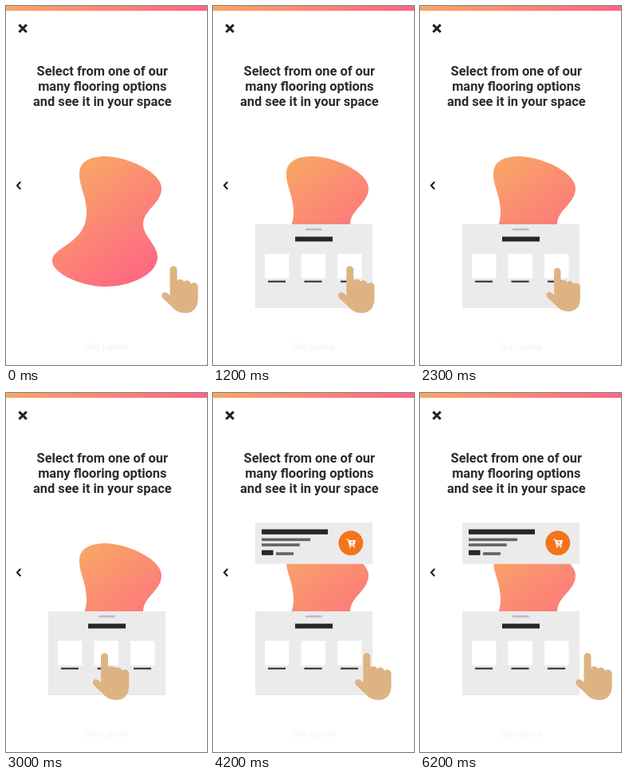
These frames come from a looping animation (252x449 px, 6.3 s). An HTML page with a canvas:

```html
<!DOCTYPE html>
<html lang="en">
<head>
<meta charset="utf-8">
<title>Flooring tutorial</title>
<style>
  html, body { margin: 0; width: 100%; height: 100%; overflow: hidden; background: #fff; }
  canvas { display: block; width: 252px; height: 449px; }
</style>
</head>
<body>
<canvas id="stage"></canvas>
<script>
const W = 252, H = 449, LOOP = 6300;
const canvas = document.getElementById('stage');
const ctx = canvas.getContext('2d');
const ratio = window.devicePixelRatio || 1;
canvas.width = Math.round(W * ratio);
canvas.height = Math.round(H * ratio);

const DARK = '#262626', GREY = '#646464', PANEL = '#ebebeb';
const PITCH = 45.5;

const blob = new Path2D('M92 208C93 192 110 188 124 188C152 188 195 208 195 228' +
  'C195 247 172 255 172 273C172 288 190 299 190 314C190 335 157 351 124 351' +
  'C94 351 58 334 58 319C58 300 101 298 101 258C101 237 91 224 92 208Z');
const HAND = { x: 218, y: 354.5 };
const hand = new Path2D('M205.5 330C205.5 323.8 214.5 323.8 214.5 330V344' +
  'C216 341 222 341 223 345C225 342 231 343 232 347.5C235 344.5 240.7 346 240.7 351' +
  'V366C240.7 378 234 384 225 384C216 384 211 380 207 375L197 366' +
  'C193 361 197 356 202 359L205.5 362Z');

const clamp = v => Math.min(1, Math.max(0, v));
const mix = (a, b, p) => a + (b - a) * p;
const outCubic = p => 1 - (1 - p) ** 3;
const inOutCubic = p => p < .5 ? 4 * p ** 3 : 1 - 4 * (1 - p) ** 3;
const inOutSine = p => (1 - Math.cos(Math.PI * p)) / 2;
const outBack = p => 1 + 2.70158 * (p - 1) ** 3 + 1.70158 * (p - 1) ** 2;
const linear = p => p;

// Each move is [start, end, value, easing]; the value holds between moves.
function track(t, value, moves) {
  for (const [start, end, to, ease] of moves) {
    if (t < start) break;
    value = mix(value, to, ease(clamp((t - start) / (end - start))));
  }
  return value;
}

const LEFT = 88.7, RIGHT = LEFT + 2 * PITCH;
const handX = t => track(t, HAND.x, [
  [700, 1200, RIGHT, outCubic],
  [1300, 1800, LEFT, inOutCubic],
  [1800, 2200, RIGHT, outCubic],
  [2300, 2800, LEFT, inOutCubic],
  [2800, 3200, 137.5, outCubic],
  [4000, 4500, HAND.x, outCubic]
]);
const handScale = t => track(t, 1, [
  [1200, 1300, .93, linear],
  [1800, 1900, 1, linear],
  [2200, 2300, .93, linear],
  [2800, 2900, 1, linear]
]);
const scroll = t => -2 * PITCH * track(t, 0, [
  [1300, 1800, 1, inOutCubic],
  [2300, 2800, 2, inOutCubic]
]);
const panelY = t => track(t, 176, [
  [0, 100, -52, p => p < 1 ? 0 : 1],
  [100, 300, 6, inOutSine],
  [300, 500, -2, inOutSine],
  [500, 600, 0, inOutSine]
]);

function rect(x, y, w, h, color) {
  ctx.fillStyle = color;
  ctx.fillRect(x, y, w, h);
}

function line(points, width, color) {
  ctx.beginPath();
  points.forEach(([x, y], i) => i ? ctx.lineTo(x, y) : ctx.moveTo(x, y));
  ctx.lineWidth = width;
  ctx.strokeStyle = color;
  ctx.stroke();
}

function disc(x, y, r, color) {
  ctx.beginPath();
  ctx.arc(x, y, r, 0, Math.PI * 2);
  ctx.fillStyle = color;
  ctx.fill();
}

function gradient(x0, y0, x1, y1) {
  const g = ctx.createLinearGradient(x0, y0, x1, y1);
  g.addColorStop(0, '#f8a666');
  g.addColorStop(1, '#ff6584');
  return g;
}

function text(str, x, y, font, color) {
  ctx.font = font + ' Roboto, sans-serif';
  ctx.fillStyle = color;
  ctx.textAlign = 'center';
  ctx.fillText(str, x, y);
}

function drawPage() {
  rect(0, 0, W, H, '#fff');
  rect(0, 0, W, 6, gradient(0, 0, W, 0));
  ctx.lineCap = 'butt';
  line([[16.4, 23.4], [25.8, 32.8]], 3, '#222');
  line([[25.8, 23.4], [16.4, 32.8]], 3, '#222');
  line([[18.3, 220], [13.9, 224.5], [18.3, 229]], 1.9, '#111');
  const title = ['Select from one of our', 'many flooring options', 'and see it in your space'];
  title.forEach((s, i) => text(s, 120.8, 87 + 19 * i, '700 16.4px', '#2b2b2b'));
  text('Skip tutorial', 126.3, 430, '300 10.4px', '#ededed');
  ctx.fillStyle = gradient(88, 200, 185, 335);
  ctx.fill(blob);
}

function drawPanel(t) {
  ctx.save();
  ctx.translate(0, panelY(t));
  rect(53, 273, 147, 105, PANEL);
  ctx.beginPath();
  ctx.rect(53, 273, 147, 105);
  ctx.clip();
  ctx.lineCap = 'round';
  line([[117, 279.5], [135.5, 279.5]], 2.4, '#bdbdbd');
  rect(103, 288.5, 47, 6, DARK);
  const shift = scroll(t);
  for (let i = 0; i < 7; i++) {
    const x = 65 + PITCH * i + shift;
    rect(x, 310, 30.5, 30.5, '#fff');
    rect(x + 4, 343.6, 22, 2, DARK);
  }
  ctx.restore();
}

function drawCart() {
  ctx.lineCap = ctx.lineJoin = 'round';
  line([[167.3, 183], [169.4, 183], [171.3, 190.6], [177.2, 190.6]], 1.2, '#fff');
  ctx.beginPath();
  ctx.moveTo(169.8, 184);
  ctx.lineTo(179, 184);
  ctx.lineTo(177.6, 189.4);
  ctx.lineTo(171, 189.4);
  ctx.fillStyle = '#fff';
  ctx.fill();
  line([[174.3, 185.2], [174.3, 188.2]], .8, '#f2741c');
  line([[172.8, 186.7], [175.8, 186.7]], .8, '#f2741c');
  disc(172, 192.5, 1.1, '#fff');
  disc(176.8, 192.5, 1.1, '#fff');
  ctx.lineJoin = 'miter';
}

function drawCard(t) {
  if (t <= 3300) return;
  const p = clamp((t - 3300) / 700), s = outBack(p);
  ctx.save();
  ctx.translate(126.5, 187.7);
  ctx.scale(s, s);
  ctx.translate(-126.5, -187.7);
  if (p < 1) {
    ctx.beginPath();
    ctx.roundRect(53, 162, 147, 51.8, 2);
    ctx.fillStyle = PANEL;
    ctx.fill();
    ctx.lineWidth = .7;
    ctx.strokeStyle = '#bcbcbc';
    ctx.stroke();
  } else {
    rect(53, 162, 147, 51.8, PANEL);
  }
  rect(61, 170.5, 83, 6.3, DARK);
  rect(61, 181.6, 61, 3.6, GREY);
  rect(61, 188.2, 47.7, 3.6, GREY);
  rect(61, 196.6, 14.5, 6.2, DARK);
  rect(79, 199.2, 22, 3.6, GREY);
  disc(172.8, 187.6, 15.4, '#f2741c');
  drawCart();
  ctx.restore();
}

function drawHand(t) {
  const s = handScale(t);
  ctx.save();
  ctx.translate(handX(t), HAND.y);
  ctx.scale(s, s);
  ctx.translate(-HAND.x, -HAND.y);
  ctx.fillStyle = '#deb383';
  ctx.fill(hand);
  ctx.restore();
}

function frame() {
  const t = performance.now() % LOOP;
  ctx.setTransform(ratio, 0, 0, ratio, 0, 0);
  drawPage();
  drawPanel(t);
  drawCard(t);
  drawHand(t);
  requestAnimationFrame(frame);
}
frame();
</script>
</body>
</html>
```
